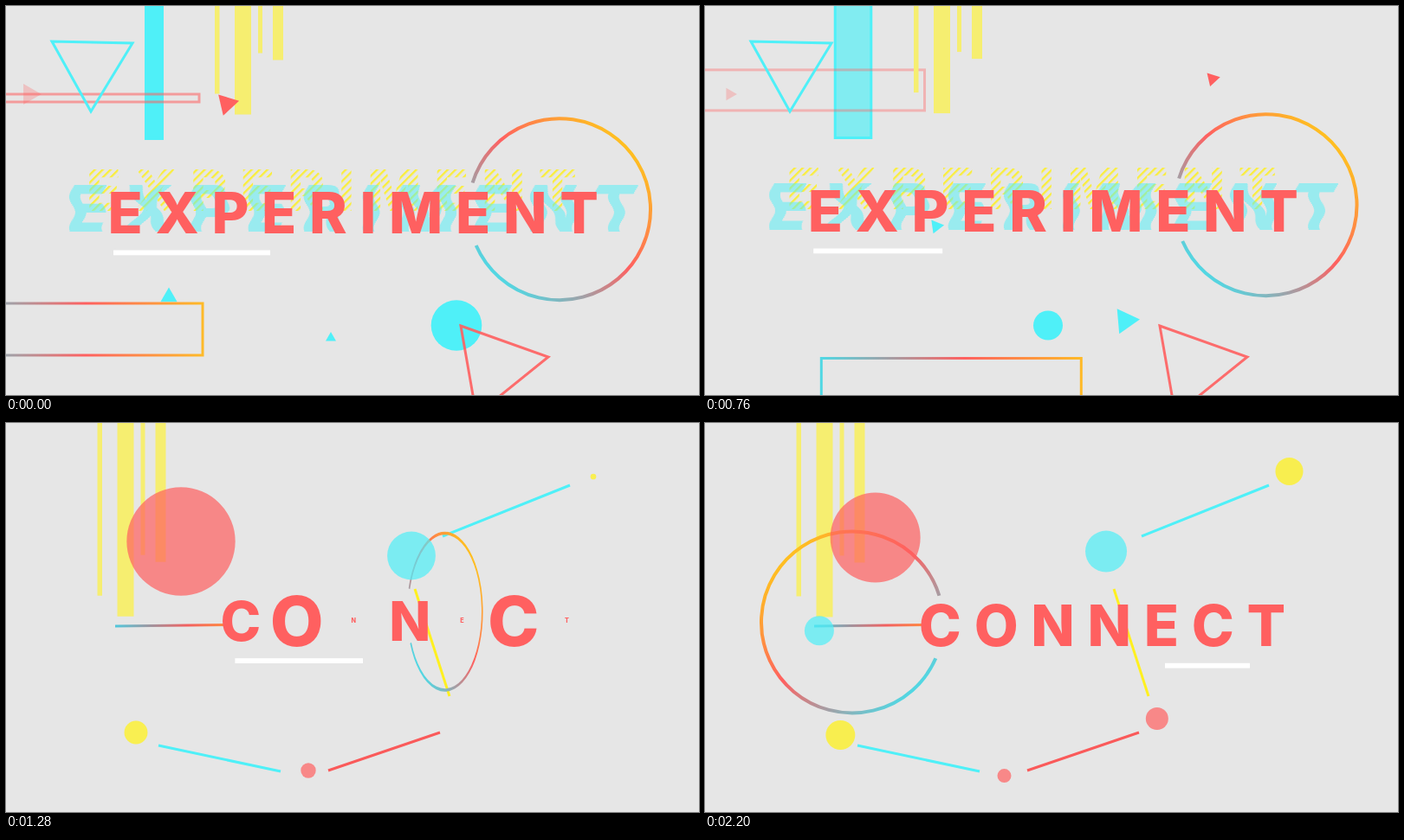
Recreate the animation shown at these times as an HTML page. Size 800 by 450 pixels, loop 2240 ms.

```html
<!DOCTYPE html>
<html lang="en">
<head>
<meta charset="utf-8">
<title>Experiment / Connect</title>
<style>
  html, body { margin: 0; width: 100%; height: 100%; overflow: hidden; background: #e6e6e6; }
  svg { display: block; width: 100%; height: 100%; }
  text { font: 800 66px Inter, "Open Sans", sans-serif; text-anchor: middle; }
  .word { letter-spacing: 14.7px; }
  #echo { font-size: 74px; letter-spacing: 19px; }
</style>
</head>
<body>
<svg id="stage" viewBox="0 0 800 450">
  <defs>
    <linearGradient id="ringInk" gradientUnits="userSpaceOnUse" x1="-105" y1="105" x2="105" y2="-105">
      <stop offset=".14" stop-color="#50d8e4"/><stop offset=".53" stop-color="#ff6060"/><stop offset=".86" stop-color="#ffc020"/>
    </linearGradient>
    <linearGradient id="boxInk">
      <stop offset="0" stop-color="#50d8e4"/><stop offset=".55" stop-color="#ff6060"/><stop offset="1" stop-color="#ffba28"/>
    </linearGradient>
    <linearGradient id="wireInk" gradientUnits="userSpaceOnUse" x1="126" y1="0" x2="254" y2="0">
      <stop offset="0" stop-color="#50c8dc"/><stop offset=".65" stop-color="#f26060"/><stop offset="1" stop-color="#ff8a40"/>
    </linearGradient>
    <pattern id="hatch" width="6.4" height="6.4" patternUnits="userSpaceOnUse" patternTransform="rotate(45)">
      <rect width="2.3" height="6.4" fill="#faee3c"/>
    </pattern>
  </defs>
</svg>
<script>
const LOOP = 2240, STEP = 40, CUT = 1160;
const RED = '#ff6060', CYAN = '#4ff0f8', YELLOW = '#fbf040';
const TAU = Math.PI * 2;
const stage = document.getElementById('stage');
const defs = stage.querySelector('defs');

function set(el, attrs) {
  for (const name in attrs) el.setAttribute(name, attrs[name]);
}
function add(parent, tag, attrs = {}, label = '') {
  const el = document.createElementNS('http://www.w3.org/2000/svg', tag);
  set(el, attrs);
  if (label) el.textContent = label;
  return parent.appendChild(el);
}

const mix = (a, b, u) => a + (b - a) * u;
const linear = (t, start, end) => Math.min(1, Math.max(0, (t - start) / (end - start)));
const settle = (t, start, end, power = 2) => 1 - (1 - linear(t, start, end)) ** power;
const smooth = (t, start, end) => {
  const u = linear(t, start, end);
  return u * u * (3 - 2 * u);
};
// Spring that leaves 0 at rest, overshoots and settles at 1.
function pop(age) {
  const decay = .0138, spin = .0286;
  return age < 0 ? 0
    : 1 - Math.exp(-decay * age) * (Math.cos(spin * age) + decay / spin * Math.sin(spin * age));
}
const bob = t => 7 * Math.cos(TAU * (t - 310) / 2500);

const updates = [];
const first = add(stage, 'g');
const bars = add(stage, 'g', { fill: '#f6ee70' });
const second = add(stage, 'g');
const ringLayer = add(stage, 'g');
const dots = add(stage, 'g');
const firstFront = add(stage, 'g');
const titles = add(stage, 'g');
const underline = add(stage, 'rect', { height: 5.8, fill: '#fff' });

// First scene
const outlined = (parent, tag, stroke, attrs) =>
  add(parent, tag, { fill: 'none', stroke, 'stroke-width': 3, ...attrs });

const pillar = outlined(first, 'rect', CYAN, { y: -10, fill: CYAN });
const frame = outlined(first, 'rect', RED, { x: -20 });
outlined(first, 'path', CYAN, { d: 'M53 41L146 43L98 122Z' });
const box = outlined(first, 'rect', 'url(#boxInk)', { width: 300, height: 60 });
const ball = add(first, 'circle', { fill: CYAN });
const bigTriangle = outlined(first, 'path', RED, { d: 'M525 370L626 406L543 473Z', opacity: .9 });

updates.push(t => {
  const width = mix(19, 55, linear(t, 0, 960) ** 2);
  set(pillar, {
    x: 171 - width / 2, width, height: 161 + bob(t) / 2,
    'fill-opacity': .6 + .4 * Math.cos(TAU * t / 980)
  });
  const open = settle(t, 0, 760), half = mix(4.5, 23.5, open);
  set(frame, {
    y: 106.5 - .012 * t - half, height: 2 * half, width: mix(243, 273.5, open),
    opacity: mix(.55, .38, open)
  });
  set(box, { x: mix(-73, 152, settle(t, 440, 1000, 3)), y: mix(344, 407.5, settle(t, 0, 360)) });
  const roll = linear(t, 0, 720);
  set(ball, { cx: mix(520, 396, roll), cy: 369.5, r: mix(29.3, 17, roll ** 3) });
  set(bigTriangle, { transform: `translate(${mix(0, -174, smooth(t, 780, 960))})` });
});

// Solid triangles; pose(t) gives [x, y, side, rotation].
function triangle(parent, fill, opacity, pose) {
  const el = add(parent, 'path', { d: 'M0 -.577L.5 .289L-.5 .289Z', fill, opacity });
  updates.push(t => {
    const [x, y, side, turn] = pose(t);
    set(el, { transform: `translate(${x} ${y}) rotate(${turn}) scale(${side})` });
  });
}
triangle(first, RED, .28, t => [27 + t / 480, 102, mix(24, 14, settle(t, 0, 960)), 90]);
triangle(first, CYAN, 1, t => {
  const u = settle(t, 0, 440);
  return [mix(188, 506, smooth(t, 0, 900)), mix(336.5, 364, u), mix(19, 29, u), 85 * u];
});
triangle(first, CYAN, 1, t => {
  const u = settle(t, 0, 440);
  return [mix(375, 267, u), mix(384, 191, smooth(t, 440, 960)), mix(12, 16, u), 82 * u];
});
triangle(firstFront, RED, 1, t =>
  [mix(255, 594, settle(t, 0, 900)), 113 - 37 * Math.sin(Math.PI * t / 1060), mix(25, 13.5, linear(t, 0, 960)), 77]);

// Hanging bars slide as one to their second place: [width, left, length].
[[5.5, 241, 100], [19, 264, 124], [5, 291, 53], [12, 308, 61]].forEach(([width, left, length]) => {
  const bar = add(bars, 'rect', { width });
  updates.push(t => {
    const u = smooth(t, 1120, 1280);
    set(bar, { x: left - 135.5 * u, height: length + 100 * u + 1.5 * Math.cos(TAU * t / 1000) });
  });
});

// Ring flips over while crossing the stage.
const ring = outlined(ringLayer, 'path', 'url(#ringInk)', { d: 'M-100.4 -30.5A105 105 0 1 1 -96.3 42', 'stroke-width': 4 });
updates.push(t => {
  const arrive = settle(t, 0, 760), flip = smooth(t, 1120, 1565), dip = Math.sin(Math.PI * flip);
  const x = mix(mix(639, 647.5, arrive), 170, flip);
  const y = mix(235, 230, arrive) + bob(t) * flip - 13 * dip;
  set(ring, { transform: `translate(${x} ${y}) scale(${1 - 2 * flip} ${1 - .17 * dip})` });
});

// Second scene: wires draw themselves, dots pop one after another and drift.
[
  [126, 235, 254, 233.5, 'url(#wireInk)'],
  [504, 131, 651, 72, CYAN],
  [472, 192, 512, 316, '#fff020'],
  [372, 402, 501, 358, '#fa5a5a'],
  [176, 373, 317, 403, CYAN]
].forEach(([x1, y1, x2, y2, stroke]) => {
  const wire = outlined(second, 'line', stroke, { x1, y1, x2, y2, pathLength: 1, 'stroke-dasharray': 1 });
  updates.push(t => set(wire, { 'stroke-dashoffset': 1 - linear(t, 1120, 1270) }));
});

// [fill, x, y, radius, drift direction in degrees]
[
  [RED, 349, 402, 8, 120],
  [RED, 202, 137, 52, 220],
  [CYAN, 468, 153.5, 24, 225],
  [YELLOW, 150, 358, 17, 25],
  [YELLOW, 678, 62, 16, 240],
  [RED, 515.5, 339, 13, 25],
  [CYAN, 125, 239, 17, 10]
].forEach(([fill, x, y, radius, angle], i) => {
  const dot = add(dots, 'circle', { fill, opacity: fill === YELLOW ? .9 : .7 });
  const direction = angle * TAU / 360;
  updates.push(t => {
    const far = 7 * linear(t, 1640, 2200);
    set(dot, {
      cx: x + far * Math.cos(direction), cy: y + far * Math.sin(direction),
      r: radius * pop(t - 1125 - 33 * i)
    });
  });
});

// First title: hatched echo, wavy cyan echo, solid word.
const experiment = add(titles, 'g');
const word = (parent, attrs) => add(parent, 'text', { class: 'word', x: 7, y: 24, ...attrs }, 'EXPERIMENT');
word(experiment, { fill: 'url(#hatch)', transform: 'translate(-25 -26)' });
word(defs, { id: 'echo', x: 9.5, y: 27, fill: CYAN });
const wavy = add(experiment, 'g', { opacity: .5, transform: 'translate(0 -4.5)' });
for (let y = -30; y < 30; y += 2) {
  const clip = add(defs, 'clipPath', { id: 'row' + y });
  add(clip, 'rect', { x: -400, y, width: 800, height: 2.4 });
  const row = add(wavy, 'g', { 'clip-path': `url(#row${y})` });
  add(row, 'use', { href: '#echo', x: 3.5 * Math.sin(y * TAU / 36 + TAU / 6) });
}
word(experiment, { fill: RED });

// Second title: letters laid out by their own widths, popping in three waves.
const connect = add(titles, 'g', { fill: RED });
const pen = document.createElement('canvas').getContext('2d');
pen.font = '800 66px Inter, "Open Sans", sans-serif';
const waves = '0120212';
let cursor = 247;
[...'CONNECT'].forEach((letter, i) => {
  const advance = pen.measureText(letter).width, x = cursor + advance / 2;
  cursor += advance + 14.7;
  const el = add(connect, 'text', { y: 24 }, letter);
  updates.push(t => set(el, { transform: `translate(${x}) scale(${pop(t - 1060 - 102 * waves[i])})` }));
});

updates.push(t => {
  const early = t < CUT;
  const dx = 1.4 * Math.sin(TAU * t / LOOP), y = 234 + bob(t);
  set(experiment, { transform: `translate(${401 + dx} ${y})` });
  set(connect, { transform: `translate(${dx} ${y})` });
  const left = early ? 124 + dx : mix(262, 531, smooth(t, 1250, 1790));
  const right = early ? left + mix(181, 149, settle(t, 0, 700)) : mix(412, 629, smooth(t, 1280, 1960));
  set(underline, { x: left, width: right - left, y: y + 43.5 });
  [first, firstFront, experiment].forEach(g => set(g, { display: early ? 'inline' : 'none' }));
  [second, dots, connect].forEach(g => set(g, { display: early ? 'none' : 'inline' }));
});

const origin = performance.now();
function tick() {
  const elapsed = (performance.now() - origin) % LOOP;
  const t = Math.floor(elapsed / STEP) * STEP;
  updates.forEach(update => update(t));
  requestAnimationFrame(tick);
}
tick();
</script>
</body>
</html>
```
